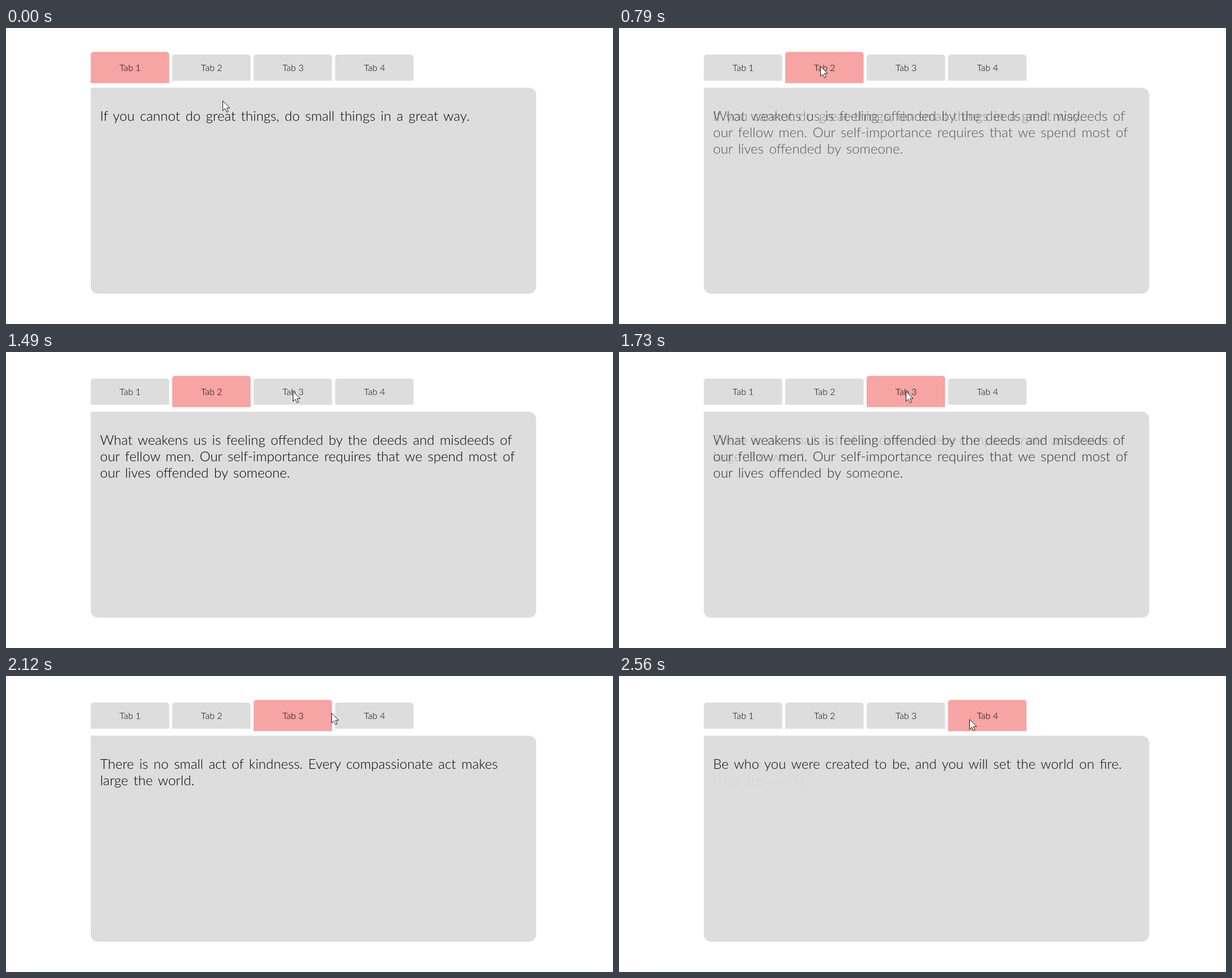
These frames come from a looping animation (1071 by 523 pixels, 2.65 s). An HTML page:

```html
<!DOCTYPE html>
<html lang="en">
<head>
<meta charset="utf-8">
<title>Tabs</title>
<style>
  html, body { margin: 0; width: 100%; height: 100%; overflow: hidden; background: #fff; }
  svg { display: block; width: 100vw; height: 100vh; }
  text { font-family: Quicksand, "Lato Light", Lato, sans-serif; font-weight: 300; fill: #000; }
  .tab { fill: #ddd; }
  .tab.active { fill: #f7a4a4; }
  .label { font-size: 16px; text-anchor: middle; }
  .quote { font-size: 24px; word-spacing: 3px; }
</style>
</head>
<body>
<svg viewBox="0 0 1071 523">
  <g id="tabs"></g>
  <path fill="#ddd" d="M149.5 105.5H922.5a13 13 0 0 1 13 13V456.5a13 13 0 0 1-13 13H162.5a13 13 0 0 1-13-13Z"/>
  <g id="quotes"></g>
  <path id="cursor" fill="#fff" stroke="#000" stroke-width=".9" d="M.5 .8V18.2L4.5 14.4L7.4 20.6L10.2 19.4L7.4 13.2H13Z"/>
</svg>
<script>
const LOOP = 2650;
const QUOTES = [
  ["If you cannot do great things, do small things in a great way."],
  ["What weakens us is feeling offended by the deeds and misdeeds of",
   "our fellow men. Our self-importance requires that we spend most of",
   "our lives offended by someone."],
  ["There is no small act of kindness. Every compassionate act makes",
   "large the world."],
  ["Be who you were created to be, and you will set the world on fire."]
];

function add(parent, name, attrs, text = "") {
  const node = document.createElementNS("http://www.w3.org/2000/svg", name);
  for (const key in attrs) node.setAttribute(key, attrs[key]);
  node.textContent = text;
  return parent.appendChild(node);
}

const tabGroup = document.getElementById("tabs");
const quoteGroup = document.getElementById("quotes");
const cursor = document.getElementById("cursor");

const tabs = QUOTES.map((_, i) => {
  const x = 149.5 + 143.7 * i;
  const shape = add(tabGroup, "path", { class: "tab" });
  add(tabGroup, "text", { class: "label", x: x + 69.6, y: 75.5 }, `Tab ${i + 1}`);
  return { x, shape };
});

const quotes = QUOTES.map(lines => {
  const group = add(quoteGroup, "g", {});
  lines.forEach((line, i) =>
    add(group, "text", { class: "quote", x: 166, y: 163.5 + 29.25 * i }, line));
  return group;
});

function tabPath(x, active) {
  const top = active ? 42.2 : 47;
  const bottom = active ? 97.6 : 93.2;
  return `M${x} ${bottom}V${top + 5}a5 5 0 0 1 5-5h128.4a5 5 0 0 1 5 5V${bottom}Z`;
}

// Each step holds until the next one.
const steps = [{ time: 0, tab: 0, mix: 1, x: 382, y: 128 }];
const step = (time, change) => steps.push({ ...steps[steps.length - 1], time, ...change });

function glide(start, end, x, y, lift = 0) {
  const from = steps[steps.length - 1];
  for (let k = 1; k <= 6; k++) {
    const u = k / 6, p = u * u * (3 - 2 * u);
    step(start + (end - start) * (k - 1) / 5, {
      x: from.x + (x - from.x) * p,
      y: from.y + (y - from.y) * p - lift * Math.sin(Math.PI * p)
    });
  }
}

function fade(tab, ...points) {
  points.forEach(([time, mix]) => step(time, { tab, mix }));
}

glide(100, 470, 355, 67);
fade(1, [700, .15], [790, .62], [860, .9], [940, 1]);
glide(1120, 1490, 506, 69, 6);
fade(2, [1730, .2], [1800, .62], [1870, .9], [1950, 1]);
step(2040, { x: 536, y: 67 });
step(2120, { x: 574, y: 65 });
step(2200, { x: 589, y: 64 });
step(2280, { x: 597, y: 64 });
fade(3, [2440, .25]);
step(2500, { mix: .7, x: 609, y: 70 });
step(2560, { mix: .96, x: 618, y: 76 });

function draw(now) {
  const t = now % LOOP;
  const { tab, mix, x, y } = steps.filter(s => s.time <= t).pop();
  tabs.forEach((item, i) => {
    item.shape.setAttribute("d", tabPath(item.x, i === tab));
    item.shape.classList.toggle("active", i === tab);
  });
  quotes.forEach((group, i) => {
    group.style.opacity = i === tab ? mix : i === tab - 1 ? 1 - mix : 0;
  });
  cursor.setAttribute("transform", `translate(${x} ${y})`);
}

const origin = performance.now();
function tick() {
  draw(performance.now() - origin);
  requestAnimationFrame(tick);
}
tick();
</script>
</body>
</html>
```
